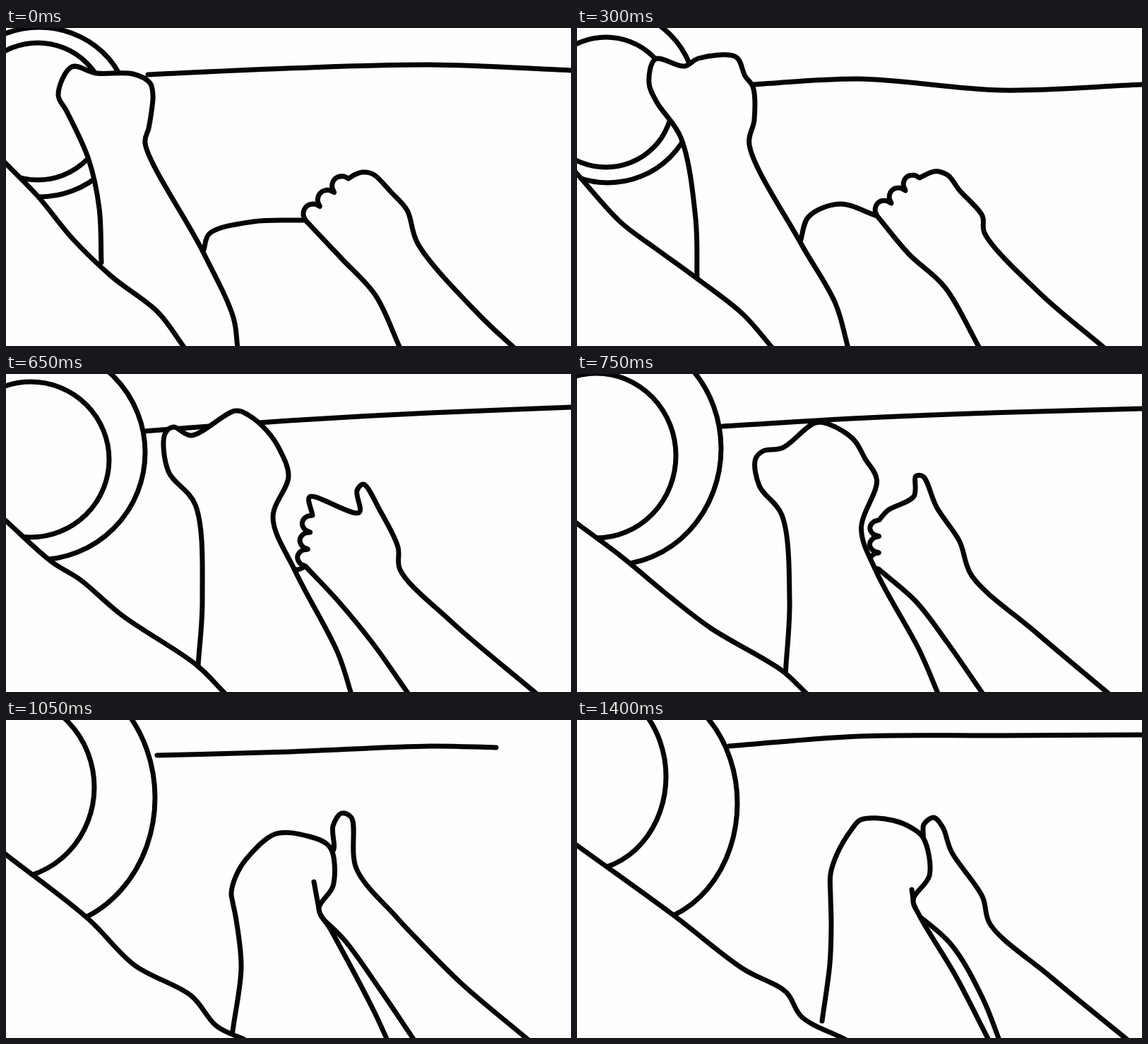
Animation, 800 px wide and 450 px high, one loop 1.45 s. Source, as an HTML page with a canvas:

```html
<!DOCTYPE html>
<html lang="en">
<head>
<meta charset="utf-8">
<title>Hands at the wheel</title>
<style>
html, body { margin: 0; width: 100%; height: 100%; overflow: hidden; background: #fefefe; }
canvas { display: block; }
</style>
</head>
<body>
<canvas id="stage" width="800" height="450"></canvas>
<script>
const ctx = document.getElementById('stage').getContext('2d');
const LOOP = 1450, STEP = 50, WHITE = '#fefefe';

// inner, outer: centre and radii of the wheel rims. dash: start, heights at x = 400 and 600, end.
// Outlines run from the left foot of each shape, over the hand, to the right foot.
const POSES = [
  { time: 0,
    inner: '45,118 98,97', outer: '47,119 127,120', dash: '201,66 57,52 803,60',
    body: '-2,190 45,238 95,299 150,352 215,402 253,453',
    near: '135,332 132,255 117,186 86,118 74,95 93,55 128,64 180,65 204,78 208,95 206,118 202,142 197,163 278,315 322,410 328,453',
    farLeft: '558,453 523,378 475,326 424,272',
    farRight: '485,213 495,207 505,204 515,205 523,209 545,232 568,258 583,305 670,406 720,453',
    lap: '280,314 288,291 350,274', hook: '0,0' },
  { time: 300,
    inner: '41,105 94,92', outer: '44,96 124,123', dash: '249,80 72,88 803,80',
    body: '-2,204 62,275 110,311 172,356 235,405 277,453',
    near: '170,355 168,270 147,155 113,105 102,78 111,44 152,54 172,43 225,41 238,68 249,83 251,130 244,165 316,303 366,390 384,453',
    farLeft: '570,453 521,367 470,320 425,266',
    farRight: '485,212 497,206 506,203 512,203 526,209 541,229 574,266 577,290 655,375 747,453',
    lap: '316,303 328,267 372,249', hook: '0,0' },
  { time: 500,
    inner: '45,117 115,102', outer: '60,106 138,154', dash: '315,73 65,60 803,66',
    body: '-2,201 50,225 90,260 190,366 240,404 290,452',
    near: '216,378 226,305 213,162 175,120 166,92 180,40 208,61 245,36 290,50 302,68 316,74 322,125 309,178 346,281 408,390 429,453',
    farLeft: '571,453 510,360 470,313 428,264',
    farRight: '485,216 503,209 512,205 521,209 531,217 547,221 565,266 590,305 660,381 733,453',
    lap: '346,281 361,264 390,260', hook: '0,0' },
  { time: 650,
    inner: '35,121 111,110', outer: '45,111 152,152', dash: '195,81 66,55 803,47',
    body: '-2,206 65,266 105,291 165,342 270,412 310,452',
    near: '272,413 278,320 268,185 230,138 225,85 237,75 262,87 325,52 343,58 370,81 388,108 400,145 378,203 410,280 470,395 489,453',
    farLeft: '570,453 520,382 470,321 424,272',
    farRight: '434,200 430,174 500,196 497,165 506,156 530,194 555,245 558,277 630,350 752,453',
    lap: '405,277 410,277 416,276', hook: '0,0' },
  { time: 850,
    inner: '20,110 114,123', outer: '55,100 156,177', dash: '218,67 59,54 803,51',
    body: '-2,214 60,250 160,341 215,378 310,427 340,452',
    near: '319,427 324,320 312,214 287,180 280,157 290,143 320,122 350,86 375,86 413,104 428,132 449,155 427,235 438,280 500,388 534,453',
    farLeft: '580,453 530,380 490,323 430,280',
    farRight: '422,213 450,212 454,150 463,124 474,134 489,184 528,228 560,294 668,380 755,453',
    lap: '400,280 410,280 420,280', hook: '0,0' },
  { time: 1050,
    inner: '0,95 125,130', outer: '46,110 165,185', dash: '214,50 45,37 694,39',
    body: '-2,189 116,281 182,347 262,390 298,433 337,452',
    near: '321,440 333,350 326,283 321,258 319,245 325,222 340,197 382,161 430,165 455,176 463,190 463,235 443,267 460,297 520,410 540,453',
    farLeft: '578,453 530,382 478,310 438,272',
    farRight: '445,190 463,185 463,150 475,132 489,138 496,210 552,278 580,308 645,373 740,453',
    lap: '410,272 420,272 430,272', hook: '-7,-38' },
  { time: 1400,
    inner: '10,80 116,133', outer: '85,118 142,170', dash: '215,37 23,22 803,21',
    body: '-2,176 135,275 235,352 296,385 318,420 380,452',
    near: '347,426 358,345 360,290 359,250 359,218 368,190 388,156 402,141 447,142 476,154 491,168 499,220 476,254 485,277 535,360 583,453',
    farLeft: '598,453 575,395 530,318 470,266',
    farRight: '480,200 490,166 491,148 505,138 518,152 530,186 574,250 585,289 670,363 780,453',
    lap: '440,267 450,267 460,267', hook: '-2,-14' }
];

const parse = text => text.split(' ').map(pair => pair.split(',').map(Number));
for (const pose of POSES)
  for (const part in pose) if (part !== 'time') pose[part] = parse(pose[part]);

const mix = (a, b, k) => Array.isArray(a) ? a.map((v, i) => mix(v, b[i], k)) : a + (b - a) * k;

function poseAt(t) {
  const next = POSES.findIndex(pose => pose.time >= t);
  if (next < 1) return POSES[0];
  const a = POSES[next - 1], b = POSES[next], k = (t - a.time) / (b.time - a.time);
  return Object.fromEntries(Object.keys(a).map(part => [part, mix(a[part], b[part], k)]));
}

const knot = (a, b) => Math.max(0.1, Math.sqrt(Math.hypot(b[0] - a[0], b[1] - a[1])));

// Centripetal Catmull-Rom curve, added to the path as Bezier segments.
function curve(path, points) {
  const last = points.length - 1;
  const all = [mix(points[1], points[0], 2), ...points, mix(points[last - 1], points[last], 2)];
  path.lineTo(...points[0]);
  for (let i = 1; i <= last; i++) {
    const [p, a, b, n] = all.slice(i - 1, i + 3);
    const before = knot(p, a), span = knot(a, b), after = knot(b, n);
    const handle = (from, to, far, side) => [0, 1].map(c => from[c] + (to[c] - from[c]
      + span * ((from[c] - far[c]) / side - (to[c] - far[c]) / (side + span))) / 3);
    path.bezierCurveTo(...handle(a, b, p, before), ...handle(b, a, n, after), ...b);
  }
  return path;
}

// Three curled fingers: round bumps on the left of the line a-b.
function fingers(path, a, b) {
  const dx = b[0] - a[0], dy = b[1] - a[1], height = 13 / Math.hypot(dx, dy);
  for (let s = 0; s <= 1; s += 1 / 36) {
    const out = height * Math.sqrt(Math.abs(Math.sin(3 * Math.PI * s)));
    path.lineTo(a[0] + dx * s + dy * out, a[1] + dy * s - dx * out);
  }
}

const line = points => curve(new Path2D(), points);

function solid(path) {
  ctx.fill(path);
  ctx.stroke(path);
}

function rim([centre, radii]) {
  const path = new Path2D();
  path.ellipse(...centre, ...radii, 0, 0, 2 * Math.PI);
  solid(path);
}

function draw(time) {
  const pose = poseAt(Math.floor(time % LOOP / STEP) * STEP);
  const { near, farLeft, farRight, body } = pose;
  const [dashStart, [y400, y600], dashEnd] = pose.dash;
  const knuckle = farLeft[farLeft.length - 1], wrist = near[12];

  ctx.fillStyle = WHITE;
  ctx.fillRect(0, 0, 800, 450);
  ctx.strokeStyle = '#050505';
  ctx.lineWidth = 7;
  ctx.lineCap = ctx.lineJoin = 'round';

  ctx.stroke(line([dashStart, [400, y400], [600, y600], dashEnd]));
  rim(pose.outer);
  rim(pose.inner);
  ctx.stroke(line([...pose.lap, knuckle]));

  const farArm = line(farLeft);
  fingers(farArm, knuckle, farRight[0]);
  solid(curve(farArm, farRight));

  solid(line(near));
  if (pose.hook[0][0]) ctx.stroke(line([wrist, mix(wrist, wrist.map((v, i) => v + pose.hook[0][i]), 1)]));

  const below = line(body);
  below.lineTo(-2, 460);
  ctx.fill(below);
  ctx.stroke(line(body));
}

function tick() {
  draw(performance.now());
  requestAnimationFrame(tick);
}
tick();
</script>
</body>
</html>
```
